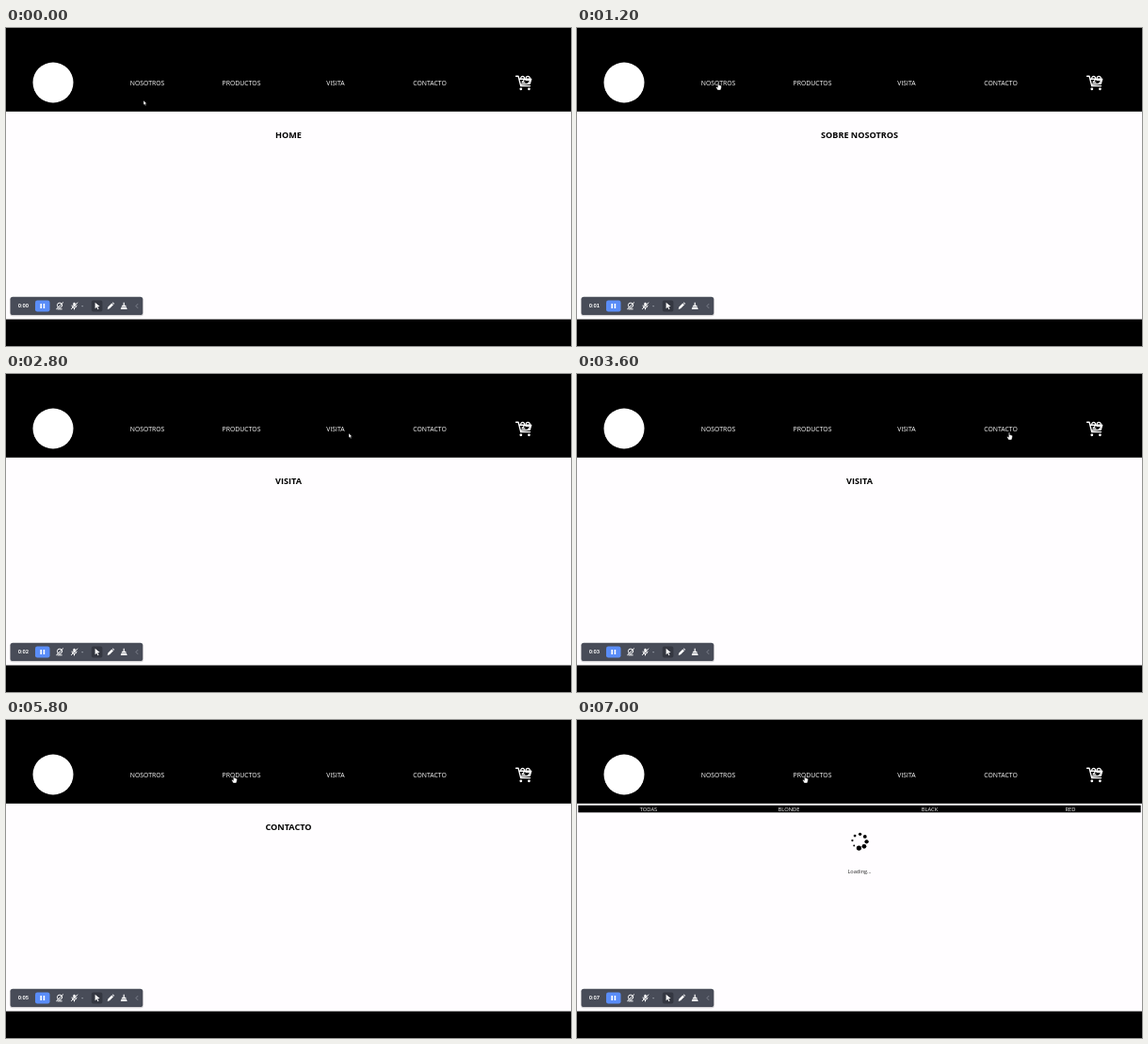
Write an HTML page that moves like this. It is 600 px wide and 338 px high and loops after 8 s.

```html
<!DOCTYPE html>
<html lang="es">
<head>
<meta charset="utf-8">
<title>Tienda</title>
<style>
  html, body { margin: 0; width: 100%; height: 100%; overflow: hidden; background: #000; }
  svg { display: block; width: 100vw; height: 100vh; }
  text { font-family: "Open Sans", "Noto Sans", sans-serif; text-anchor: middle; }
  .nav { font-size: 6.87px; fill: #fff; }
  .title { font-size: 9.1px; font-weight: 700; }
  .filter { font-size: 5.75px; fill: #fff; }
  .loading { font-size: 5.6px; fill: #222; }
  .clock text {
    font: 700 5.2px Inter, "Liberation Sans", sans-serif;
    font-variant-numeric: tabular-nums; text-anchor: end; fill: #fff;
  }
  .line { fill: none; stroke: #fff; stroke-linecap: round; stroke-linejoin: round; }

  .title, .shop, .clock .digit, .cursor, .arrow, .hand { animation: 8s step-end infinite; }
  .home { animation-name: home; }
  .about { animation-name: about; }
  .visit { animation-name: visit; }
  .contact { animation-name: contact; }
  .shop { animation-name: shop; }
  .clock .digit { animation-name: tick; animation-delay: calc((var(--i) - 8) * 1s); }
  .cursor { animation-name: move; }
  .arrow { animation-name: arrow; }
  .hand { animation-name: hand; }

  @keyframes home { 0% { visibility: visible } 15%, 100% { visibility: hidden } }
  @keyframes about { 0% { visibility: hidden } 15% { visibility: visible } 32.5%, 100% { visibility: hidden } }
  @keyframes visit { 0% { visibility: hidden } 32.5% { visibility: visible } 47.5%, 100% { visibility: hidden } }
  @keyframes contact { 0% { visibility: hidden } 47.5% { visibility: visible } 75%, 100% { visibility: hidden } }
  @keyframes shop { 0% { visibility: hidden } 75%, 100% { visibility: visible } }
  @keyframes tick { 0% { visibility: visible } 12.5%, 100% { visibility: hidden } }

  /* The pointer jumps every 200 ms, which is 2.5% */
  @keyframes move {
    0% { transform: translate(146px, 77px) }
    2.5% { transform: translate(147px, 72px) }
    5% { transform: translate(149px, 65px) }
    7.5% { transform: translate(150px, 59px) }
    10% { transform: translate(150px, 58px) }
    20% { transform: translate(165px, 66px) }
    22.5% { transform: translate(235px, 74px) }
    25% { transform: translate(305px, 73px) }
    27.5% { transform: translate(343px, 65px) }
    30% { transform: translate(353px, 60px) }
    35% { transform: translate(364px, 63px) }
    37.5% { transform: translate(392px, 67px) }
    40% { transform: translate(430px, 66px) }
    42.5% { transform: translate(456px, 63px) }
    45% { transform: translate(459px, 62px) }
    47.5% { transform: translate(460px, 61px) }
    50% { transform: translate(460px, 60px) }
    52.5% { transform: translate(452px, 59px) }
    55% { transform: translate(434px, 58px) }
    57.5% { transform: translate(405px, 58px) }
    60% { transform: translate(292px, 59px) }
    62.5%, 100% { transform: translate(242px, 59px) }
  }
  @keyframes arrow {
    0%, 20%, 35%, 57.5% { visibility: visible }
    7.5%, 30%, 42.5%, 62.5%, 100% { visibility: hidden }
  }
  @keyframes hand {
    0%, 20%, 35%, 57.5% { visibility: hidden }
    7.5%, 30%, 42.5%, 62.5%, 100% { visibility: visible }
  }
</style>
</head>
<body>
<svg viewBox="0 0 600 338">
  <rect width="600" height="338"/>
  <rect y="88.8" width="600" height="220.8" fill="#fffdff"/>

  <circle cx="50" cy="58" r="21.5" fill="#fff"/>
  <g class="nav">
    <text x="150" y="61">NOSOTROS</text>
    <text x="250" y="61">PRODUCTOS</text>
    <text x="350" y="61">VISITA</text>
    <text x="450" y="61">CONTACTO</text>
  </g>

  <g class="line" stroke-width="1.4">
    <path d="M541.6 51.3h2.5l2.6 10.3h9.8M544.7 54.2h13l-1.5 5.2-10 .6"/>
    <path d="M546.8 53.8v-1.4q2-2.2 3.6 0v2.4l-2.4 3h3M552.2 55.4v-3q2-2.2 4 0v4.2l-1.8 2.2" stroke-width="1.2"/>
    <path d="M552.2 55.4h4" stroke-width="1.2"/>
  </g>
  <g fill="#fff"><circle cx="546.8" cy="64.8" r="1.4"/><circle cx="555.4" cy="64.8" r="1.4"/></g>

  <text class="title home" x="300" y="117.2">HOME</text>
  <text class="title about" x="300" y="117.2">SOBRE NOSOTROS</text>
  <text class="title visit" x="300" y="117.2">VISITA</text>
  <text class="title contact" x="300" y="117.2">CONTACTO</text>

  <g class="shop">
    <rect x="1.3" y="90.7" width="597.4" height="7.6"/>
    <g class="filter">
      <text x="76" y="96.7">TODAS</text>
      <text x="225" y="96.7">BLONDE</text>
      <text x="374.5" y="96.7">BLACK</text>
      <text x="524" y="96.7">RED</text>
    </g>
    <g id="spinner"></g>
    <text class="loading" x="300" y="162.8">Loading...</text>
  </g>

  <!-- Recorder bar -->
  <rect x="4" y="286" width="142" height="20.3" rx="3" fill="#000" opacity=".16"/>
  <rect x="4.6" y="285.7" width="140.6" height="19.4" rx="2.6" fill="#484c58"/>
  <g class="clock" id="clock"><text x="20.8" y="297.4">0:0</text></g>
  <rect x="31" y="289.6" width="15.5" height="11.8" rx="2.2" fill="#5a8df8"/>
  <path d="M36.4 292.9h1.6v5.2h-1.6zM39.6 292.9h1.6v5.2h-1.6z" fill="#fff"/>
  <g class="line" stroke-width="1">
    <circle cx="57" cy="294.7" r="2.6"/>
    <path d="M54.8 298.8h4.4M53.6 298.6l7-6.8"/>
    <path d="M70 295q.2 2.4 2.5 2.4t2.5-2.4M72.5 297.4v1.6M69.4 298.6l6.4-6.6"/>
  </g>
  <rect x="71.3" y="291.8" width="2.4" height="4.4" rx="1.2" fill="#fff"/>
  <path d="M80 295.2h2.2l-1.1 1.3z" fill="#a9adb7"/>
  <rect x="90.8" y="289.6" width="11.6" height="11.8" rx="2" fill="#343741"/>
  <g fill="#fff">
    <path d="M94.6 291.7l5 4.3-2.3.2 1.2 2.5-1 .5-1.2-2.5-1.7 1.5z"/>
    <path d="M107.7 298.9l.6-2.3 4-4 1.7 1.7-4 4zM112.9 292l.7-.6 1.6 1.6-.6.7z"/>
    <path d="M124.6 291.8h1.2v3h1.3l.5 1.2h-4.8l.5-1.2h1.3zM122.6 296.5h5.2l.9 2.4h-7z"/>
  </g>
  <path class="line" d="M139.8 293.5l-1.8 2 1.8 2" stroke-width=".8" style="stroke:#8c909b"/>

  <g class="cursor">
    <path class="arrow" d="M0 0v4.8l1.1-1 .8 1.8.9-.4-.8-1.7h1.6z" fill="#fff" stroke="#000" stroke-width=".35"/>
    <path class="hand" d="M-.6.6q.6-1 1.2 0v2l2.3.6q.6.3.5 1.2l-.5 2.6-.5 1H-.7L-2.3 5.3q-.3-.9.6-.8l1.1.8z" fill="#fff" stroke="#000" stroke-width=".4"/>
  </g>
</svg>
<script>
  const add = (parent, tag, attrs, text = "") => {
    const el = document.createElementNS("http://www.w3.org/2000/svg", tag);
    for (const key in attrs) el.setAttribute(key, attrs[key]);
    el.textContent = text;
    parent.append(el);
  };
  const spinner = document.getElementById("spinner");
  const clock = document.getElementById("clock");
  for (let i = 0; i < 8; i++) {
    // Dots shrink counterclockwise from the bottom
    const a = 1.65 - i * Math.PI / 4;
    add(spinner, "circle", {
      cx: 300 + 7.6 * Math.cos(a), cy: 128.7 + 7.4 * Math.sin(a), r: 2.65 - i * 0.25
    });
    add(clock, "text", { class: "digit", x: 24.2, y: 297.4, style: `--i:${i}` }, i);
  }
</script>
</body>
</html>
```
